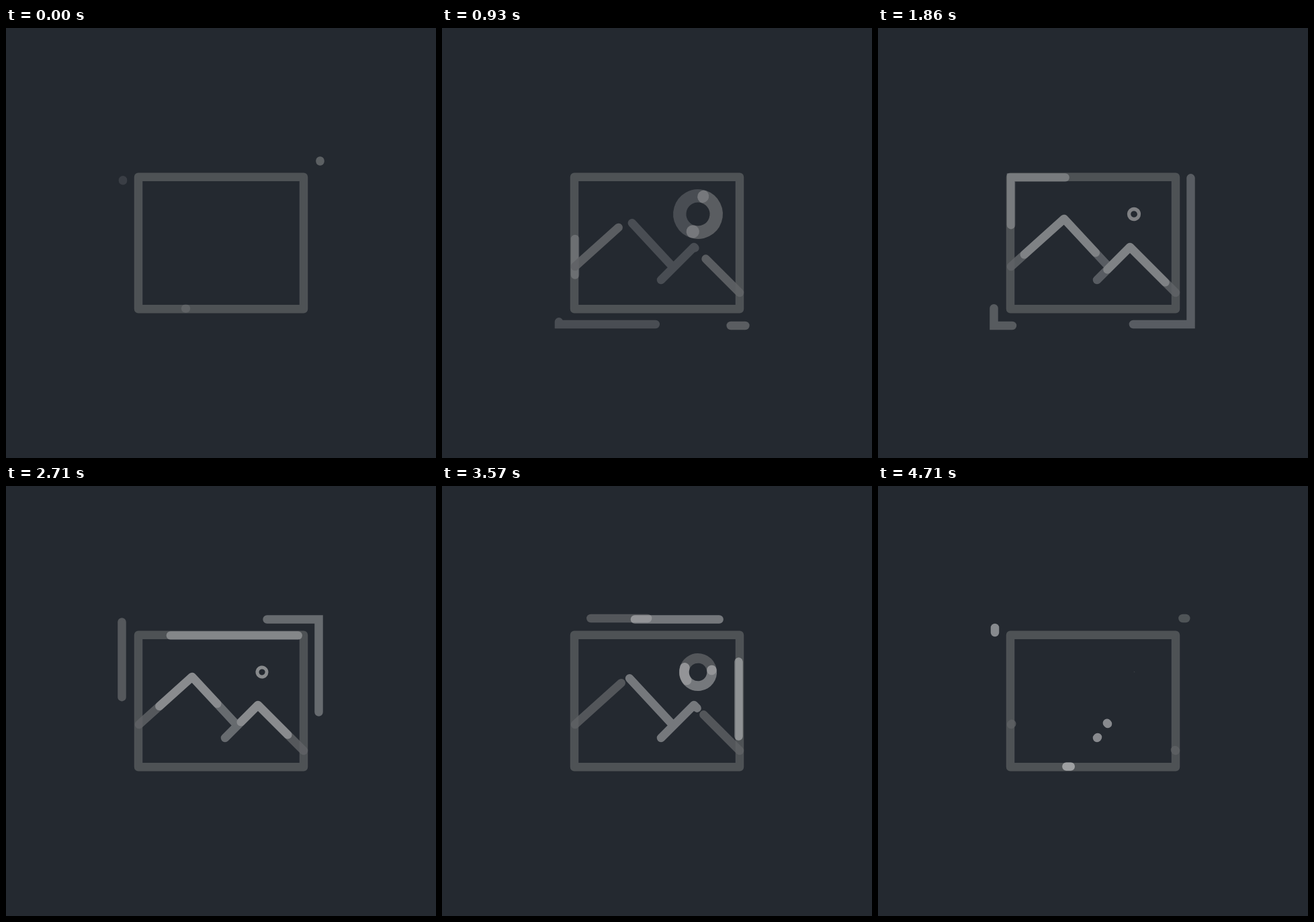
An HTML page with a canvas for the animation above (4780 ms loop, 640 by 640 pixels).

```html
<!DOCTYPE html>
<html>
<head>
<meta charset="utf-8">
<style>
  html, body { margin: 0; width: 100%; height: 100%; overflow: hidden; background: #242930; }
  canvas { display: block; }
</style>
</head>
<body>
<canvas id="stage" width="640" height="640"></canvas>
<script>
const ctx = document.getElementById('stage').getContext('2d');
const LOOP = 4780, WIDTH = 12.5, DOT = 0.001;

const outerRing = [[174, 226], [174, 441], [465.5, 441], [465.5, 198.5], [174, 198.5], [174, 226]];
const outerRingReverse = [[467.5, 197.5], [467.5, 443], [172.5, 443], [172.5, 197], [467.5, 197]];
const innerRing = [[268, 417.5], [198, 417.5], [198, 222.5], [441.5, 222.5], [441.5, 417.5], [268, 417.5]];
const bigPeak = [[198, 355], [277, 284], [342, 354]];
const smallPeak = [[326, 375], [375, 326], [443, 394]];

const clamp = u => Math.max(0, Math.min(1, u));
const ease = (x, from, to) => (1 - Math.cos(Math.PI * clamp((x - from) / (to - from)))) / 2;

// Adds the part of a polyline between two fractions of its length.
function trim(points, from, to) {
  if (to <= from) return;
  const lengths = points.slice(1).map((p, i) => Math.hypot(p[0] - points[i][0], p[1] - points[i][1]));
  const total = lengths.reduce((a, b) => a + b);
  const start = clamp(from) * total, end = clamp(to) * total;
  let done = 0, open = false;
  lengths.forEach((len, i) => {
    const a = Math.max(start - done, 0) / len, b = Math.min(end - done, len) / len;
    const at = u => points[i].map((v, k) => v + (points[i + 1][k] - v) * u);
    if (a < b) {
      if (!open) ctx.moveTo(...at(a));
      ctx.lineTo(...at(b));
      open = true;
    }
    done += len;
  });
}

function stroke(color, build, join = 'miter', width = WIDTH) {
  ctx.strokeStyle = color;
  ctx.lineWidth = width;
  ctx.lineJoin = join;
  ctx.beginPath();
  build();
  ctx.stroke();
}

function draw(now) {
  const x = now % LOOP / LOOP, rest = 1 - x;
  const p = x + 0.02 * x * rest;
  const rising = `rgba(255,255,255,${0.1 + 0.36 * x})`;
  const fading = `rgba(96,99,102,${0.95 - 0.22 * x})`;
  // Grows by its own rule, then shrinks to a dot at a steady rate
  const dash = (grown, shrink) => Math.max(DOT, Math.min(grown, shrink * rest));

  ctx.fillStyle = '#242930';
  ctx.fillRect(0, 0, 640, 640);
  ctx.lineCap = 'round';
  stroke('#4e5255', () => ctx.rect(197, 221.75, 246, 196.5), 'round');

  // Outer strokes running in opposite directions
  const head = Math.max(DOT, x + Math.min(0.345 * x, 0.155, 0.41 * rest));
  stroke(fading, () => trim(outerRingReverse, head - dash(0.1 * x + 0.45 * x ** 4, 0.31), head));
  stroke(rising, () => trim(outerRing, p, p + dash(1.067 * x ** 1.25, 0.465)));

  // Stroke running along the picture frame
  stroke(rising, () => trim(innerRing, p - dash(0.71 * x ** 1.5, 0.5), Math.max(p, DOT)));

  // Mountains drawn from both ends, then taken back
  const reach = clamp(Math.min((x - 0.003) / 0.445, (0.99 - x) / 0.53));
  stroke(fading, () => {
    trim(bigPeak, 0, reach);
    trim(smallPeak, 1 - reach, 1);
  }, 'round');
  stroke(rising, () => {
    trim(bigPeak, 1 - reach, 1);
    trim(smallPeak, 0, reach);
  }, 'round');

  // Sun: swells twice while two arcs grow from one turning joint
  const scale = 1.55 * (ease(x, 0.02, 0.2) - ease(x, 0.84, 1))
    - 1.15 * (ease(x, 0.2, 0.41) - ease(x, 0.6, 0.84));
  if (scale > 0) {
    const joint = (147 - 208 * x) * Math.PI / 180;
    const span = 2 * Math.PI * Math.min(1, x / 0.395, rest / 0.44);
    const arc = (from, to) => () => ctx.arc(381, 277, 17.6 * scale, from, to);
    stroke(fading, arc(joint - span, joint), 'round', WIDTH * scale);
    stroke(rising, arc(joint, joint + span), 'round', WIDTH * scale);
  }
}

function tick() {
  draw(performance.now());
  requestAnimationFrame(tick);
}
tick();
</script>
</body>
</html>
```
